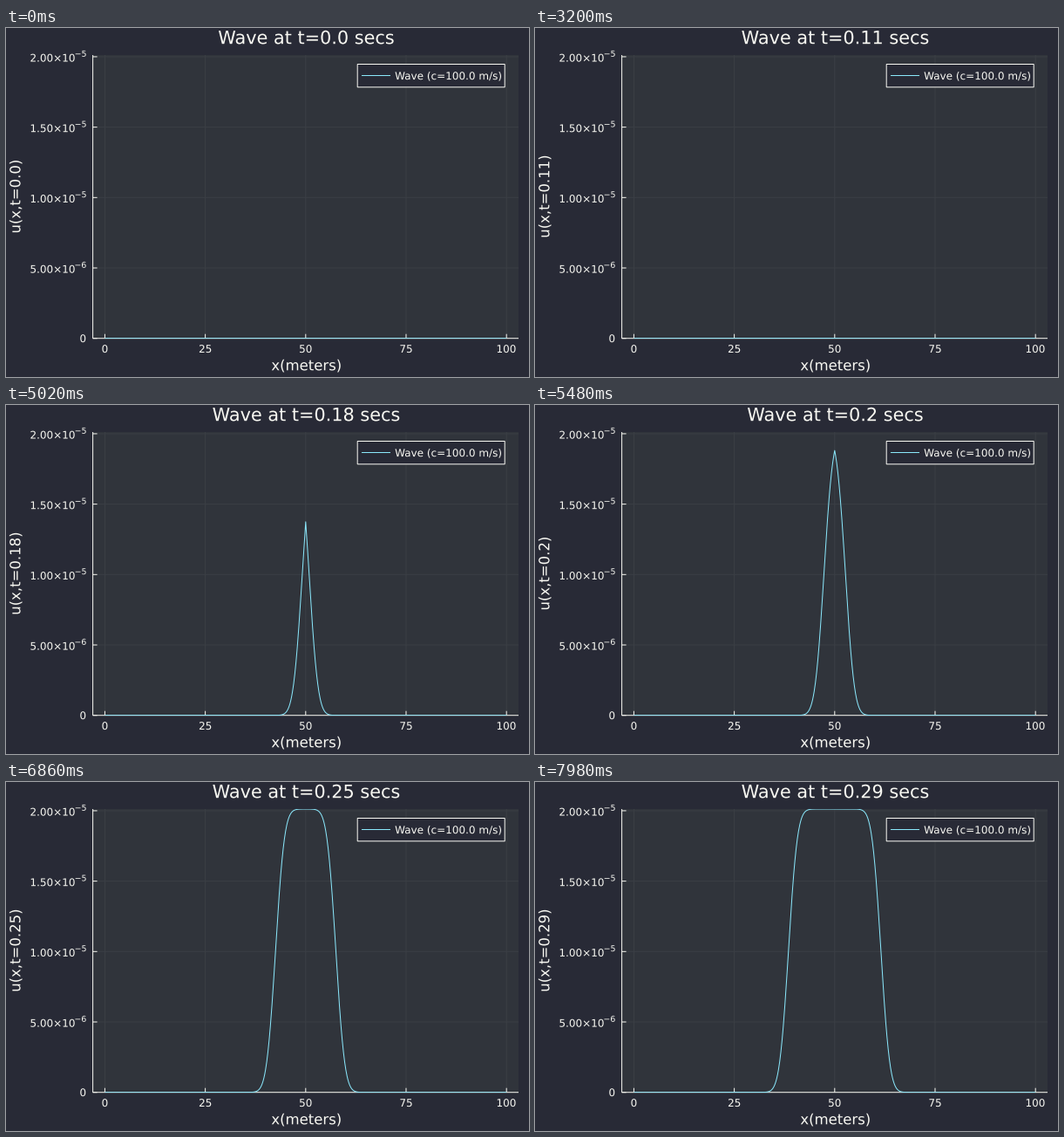
Recreate the animation shown at these times as a matplotlib script. Size 600 px wide and 400 px high, loop 8000 ms.

```python
import math

import numpy as np
import matplotlib.pyplot as plt
from matplotlib.animation import FuncAnimation
from matplotlib.patches import PathPatch, Rectangle
from matplotlib.textpath import TextPath
from matplotlib.transforms import Affine2D

plt.rcParams["font.family"] = "DejaVu Sans"

BG, INSIDE, GRID, FG, CYAN = "#282a36", "#30343b", "#3b3f45", "#f8f8f2", "#8be9fd"
PX = 0.72  # points per pixel at 100 dpi
LEFT, RIGHT, TOP, BOTTOM = 99.6, 588, 31, 355.7
PLATEAU = 20.12  # wave height in units of 1e-6
SPEED, DELAY, SHARPNESS = 100.0, 0.1699, 40.0
STEPS_PER_SECOND = 600

fig = plt.figure(figsize=(6, 4), dpi=100, facecolor=BG)
ax = fig.add_axes([0, 0, 1, 1])
ax.set_xlim(0, 600)
ax.set_ylim(400, 0)
ax.axis("off")


def to_x(meters):
    return LEFT + (meters + 3) * (RIGHT - LEFT) / 106


def to_y(micro):
    return BOTTOM - micro * (BOTTOM - TOP) / PLATEAU


def line(xs, ys, color=FG, z=2):
    return ax.plot(xs, ys, color=color, lw=PX, zorder=z, snap=False,
                   solid_capstyle="butt")[0]


def text_path(x, y, text, size, align=0.5, angle=0):
    """Glyph outlines with the baseline at y; align runs from 0 (left) to 1 (right)."""
    path = TextPath((0, 0), text, size=size)
    box = path.get_extents()
    anchor = box.x0 + align * box.width
    place = Affine2D().translate(-anchor, 0).scale(1, -1).rotate_deg(-angle)
    return place.translate(x, y).transform_path(path)


def label(*args, **kw):
    patch = PathPatch(text_path(*args, **kw), fc=FG, lw=0, zorder=6, snap=False)
    return ax.add_patch(patch)


panel = Rectangle((LEFT, TOP), RIGHT - LEFT, BOTTOM - TOP, fc=INSIDE, lw=0,
                  zorder=0, snap=False)
ax.add_patch(panel)

for meters in range(0, 101, 25):
    x = to_x(meters)
    line([x, x], [TOP, BOTTOM], GRID, 1)
    line([x, x], [BOTTOM, BOTTOM - 5])
    label(x, 372, str(meters), 12)

for micro in range(0, 21, 5):
    y = to_y(micro)
    line([LEFT, RIGHT], [y, y], GRID, 1)
    line([LEFT, LEFT + 5], [y, y])
    if micro == 0:
        label(91.3, y + 4.4, "0", 12, align=1)
        continue
    power = 5 if micro >= 10 else 6
    mantissa = micro / 10 if power == 5 else micro
    label(78.7, y + 5.6, f"{mantissa:.2f}×10", 12, align=1)
    label(91.7, y - 0.2, f"−{power}", 9.4, align=1)

line([LEFT, RIGHT], [BOTTOM, BOTTOM])
line([LEFT, LEFT], [TOP, BOTTOM])

ax.add_patch(Rectangle((403.2, 41.5), 169, 26.3, fc=BG, ec=FG, lw=PX, zorder=4,
                       snap=False))
line([408, 441], [54.5, 54.5], CYAN, 5)
label(446.5, 59.1, "Wave (c=100.0 m/s)", 12, align=0)
label(344.3, 392.3, "x(meters)", 16.5)

title = label(344.3, 18.2, "Wave", 20.8)
ylabel = label(16.4, 193.1, "u", 16.5, angle=90)

meters = np.linspace(0, 100, 1001)
curve = line(to_x(meters), to_y(0 * meters), CYAN, 3)
curve.set_clip_path(panel)
erf = np.vectorize(math.erf)


def step_at(tick):
    """Three steps per 140 ms, held for 20, 100 and 20 ms."""
    cycle, part = divmod(tick, 7)
    return 3 * cycle + (part > 0) + (part == 6)


def update(tick):
    step = step_at(tick)
    shown = (step + 3) // 6 / 100
    title.set_path(text_path(344.3, 18.2, f"Wave at t={shown} secs", 20.8))
    ylabel.set_path(text_path(16.4, 193.1, f"u(x,t={shown})", 16.5, angle=90))
    lag = step / STEPS_PER_SECOND - DELAY - np.abs(meters - 50) / SPEED
    curve.set_ydata(to_y(PLATEAU / 2 * (1 + erf(SHARPNESS * lag))))
    return title, ylabel, curve


anim = FuncAnimation(fig, update, frames=400, interval=20, repeat=True, repeat_delay=0)
plt.show()
```
